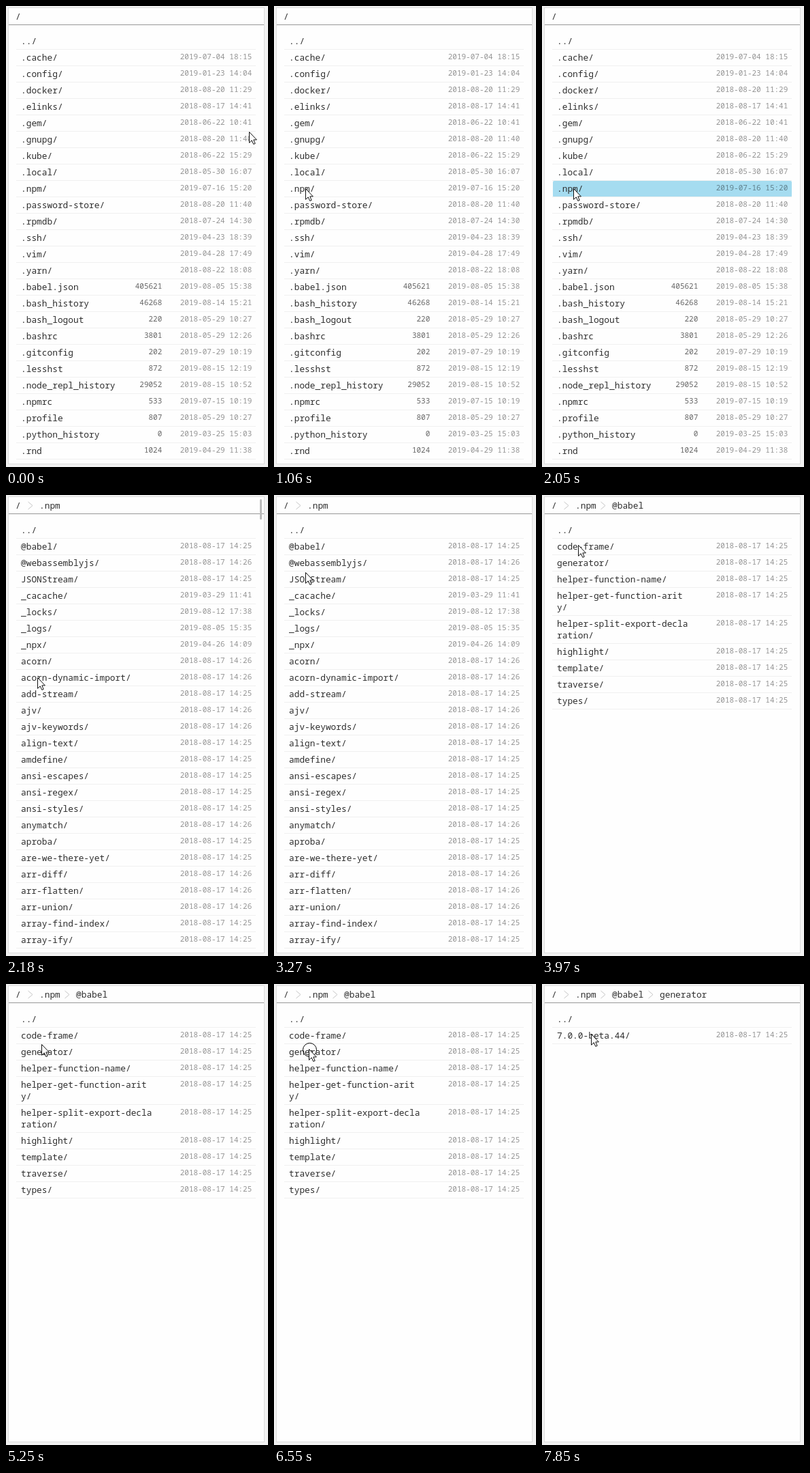
An HTML page that plays this animation: 385 px wide and 675 px high, repeating every 8000 ms.

```html
<!DOCTYPE html>
<html lang="en">
<head>
<meta charset="utf-8">
<title>File browser</title>
<style>
  html, body { margin: 0; width: 100%; height: 100%; overflow: hidden; background: #f2f2f2; }
  svg { display: block; }
  text { font: 12.83px "Noto Sans Mono", "DejaVu Sans Mono", monospace; fill: #2e2e2e; white-space: pre; }
  .size, .date { font-size: 11px; text-anchor: end; }
  .size { fill: #666; }
  .date { fill: #000; fill-opacity: .42; }
  .chevron { fill: none; stroke: #c8c8c8; }
</style>
</head>
<body>
<svg id="stage" width="385" height="675" viewBox="0 0 385 675">
  <rect width="385" height="675" fill="#f2f2f2"/>
  <rect x="3.5" y="2.5" width="376" height="668" fill="#fefefe" stroke="#ddd"/>
  <path d="M4 27.5H379" stroke="#999"/>
  <rect id="highlight" x="16" width="351" height="24" rx="2" fill="#a5dcf0"/>
  <g id="pages"></g>
  <rect id="scrollbar" x="373" y="6" width="3" height="30" rx="1.5" fill="#bbb"/>
  <circle id="ring" cx="1.5" cy="1.5" r="10" fill="none" stroke="#000"/>
  <path id="cursor" d="M.5 .5V16.3L4.2 12.8L6.8 18.4L9.2 17.4L6.8 11.9H11.4Z" fill="#fff" stroke="#111"/>
</svg>
<script>
const LOOP = 8000;
const LIST_TOP = 40, ROW_HEIGHT = 24, LINE_HEIGHT = 17;
const SVG_NS = "http://www.w3.org/2000/svg";
const $ = id => document.getElementById(id);

// Entries are "name [timestamp] [size]"; without a timestamp the install time
// applies, and a trailing + means one minute later.
const HOME = `.cache/ 20190704T1815
.config/ 20190123T1404
.docker/ 20180820T1129
.elinks/ 20180817T1441
.gem/ 20180622T1041
.gnupg/ 20180820T1140
.kube/ 20180622T1529
.local/ 20180530T1607
.npm/ 20190716T1520
.password-store/ 20180820T1140
.rpmdb/ 20180724T1430
.ssh/ 20190423T1839
.vim/ 20190428T1749
.yarn/ 20180822T1808
.babel.json 20190805T1538 405621
.bash_history 20190814T1521 46268
.bash_logout 20180529T1027 220
.bashrc 20180529T1226 3801
.gitconfig 20190729T1019 202
.lesshst 20190815T1219 872
.node_repl_history 20190815T1052 29052
.npmrc 20190715T1019 533
.profile 20180529T1027 807
.python_history 20190325T1503 0
.rnd 20190429T1138 1024`;

const NPM = `@babel/
@webassemblyjs/+
JSONStream/
_cacache/ 20190329T1141
_locks/ 20190812T1738
_logs/ 20190805T1535
_npx/ 20190426T1409
acorn/+
acorn-dynamic-import/+
add-stream/
ajv/+
ajv-keywords/+
align-text/
amdefine/
ansi-escapes/
ansi-regex/
ansi-styles/
anymatch/+
aproba/
are-we-there-yet/
arr-diff/+
arr-flatten/+
arr-union/+
array-find-index/
array-ify/`;

const BABEL = `code-frame/
generator/
helper-function-name/
helper-get-function-arity/
helper-split-export-declaration/
highlight/
template/
traverse/
types/`;

const GENERATOR = "7.0.0-beta.44/";

const CRUMBS = [["/", 14], [".npm", 49], ["@babel", 103], ["generator", 173]];

function add(parent, tag, attrs, text = "") {
  const node = document.createElementNS(SVG_NS, tag);
  for (const key in attrs) node.setAttribute(key, attrs[key]);
  node.textContent = text;
  return parent.appendChild(node);
}

function parseEntry(line) {
  const [label, stamp, size = ""] = line.split(" ");
  const name = label.replace("+", "");
  const installed = label === name ? "20180817T1425" : "20180817T1426";
  const date = (stamp || installed).replace(/(....)(..)(..)T(..)(..)/, "$1-$2-$3 $4:$5");
  return { name, size, date: name === "../" ? "" : date };
}

// Wraps at 25 characters, never leaving a slash alone on a line.
const wrap = name => name.match(/.{1,25}(?!\/$)/g);

function buildPage(listing, depth) {
  const page = add($("pages"), "g", {});
  CRUMBS.slice(0, depth + 1).forEach(([label, x], i) => {
    add(page, "text", { x, y: 20 }, label);
    if (i) add(page, "path", { class: "chevron", d: `M${x - 16.5} 10l6.5 5.5l-6.5 5.5` });
  });

  let top = LIST_TOP;
  for (const line of ["../", ...listing.split("\n")]) {
    const { name, size, date } = parseEntry(line);
    const parts = wrap(name);
    parts.forEach((part, i) => add(page, "text", { x: 22, y: top + 16 + i * LINE_HEIGHT }, part));
    add(page, "text", { class: "size", x: 229.3, y: top + 14 }, size);
    add(page, "text", { class: "date", x: 361.3, y: top + 14 }, date);
    top += ROW_HEIGHT + (parts.length - 1) * LINE_HEIGHT;
    add(page, "path", { d: `M15 ${top - 0.5}H367`, stroke: "#f0f0f0" });
  }
  return page;
}

const pages = [HOME, NPM, BABEL, GENERATOR].map(buildPage);

const easeOut = u => 1 - (1 - u) ** 3;
const easeInOut = u => u * u * (3 - 2 * u);

// The pointer jumps in a few steps, the first at `from` and the last at `to`.
const ORIGIN = { x: 357, y: 184 };
const MOVES = [
  { from: 120, to: 240, steps: 2, x: 158, y: 188, ease: easeInOut },
  { from: 510, to: 630, steps: 2, x: 89, y: 241, ease: easeInOut },
  { from: 780, to: 1060, steps: 3, x: 46, y: 267, ease: easeOut },
  { from: 2850, to: 3270, steps: 4, x: 46, y: 113, ease: easeInOut },
  { from: 3420, to: 3550, steps: 2, x: 53, y: 73, ease: easeInOut },
  { from: 5250, to: 5520, steps: 3, x: 51, y: 95, ease: easeOut },
  { from: 7600, to: 7850, steps: 3, x: 72, y: 73, ease: easeOut }
];

// A ring shows from press to release, then the row lights up until the folder opens.
const CLICKS = [
  { press: 1910, release: 2050, open: 2180, row: 9 },
  { press: 3670, release: 3820, open: 3970, row: 1 },
  { press: 6550, release: 6700, open: 6700, row: 2 }
];

function pointerAt(time) {
  let { x, y } = ORIGIN;
  for (const move of MOVES) {
    if (time < move.from) break;
    const interval = (move.to - move.from) / (move.steps - 1);
    const step = Math.min(move.steps, 1 + Math.floor((time - move.from) / interval));
    const k = move.ease(step / move.steps);
    x += (move.x - x) * k;
    y += (move.y - y) * k;
  }
  return { x: Math.round(x), y: Math.round(y) };
}

function scrollbarOpacity(age) {
  if (age < 0 || age >= 390) return 0;
  return age < 270 ? 1 : 0.5;
}

function render(time) {
  const { x, y } = pointerAt(time);
  const depth = CLICKS.filter(click => time >= click.open).length;
  const pressed = CLICKS.some(click => time >= click.press && time < click.release);
  const selected = CLICKS.find(click => time >= click.release && time < click.open);

  pages.forEach((page, i) => page.setAttribute("display", i === depth ? "inline" : "none"));
  for (const id of ["cursor", "ring"]) $(id).setAttribute("transform", `translate(${x} ${y})`);
  $("ring").setAttribute("opacity", pressed ? 1 : 0);
  $("highlight").setAttribute("opacity", selected ? 1 : 0);
  if (selected) $("highlight").setAttribute("y", LIST_TOP + selected.row * ROW_HEIGHT);
  $("scrollbar").setAttribute("opacity", scrollbarOpacity(time - CLICKS[0].open));
}

const start = performance.now();
function tick() {
  render((performance.now() - start) % LOOP);
  requestAnimationFrame(tick);
}
tick();
</script>
</body>
</html>
```
